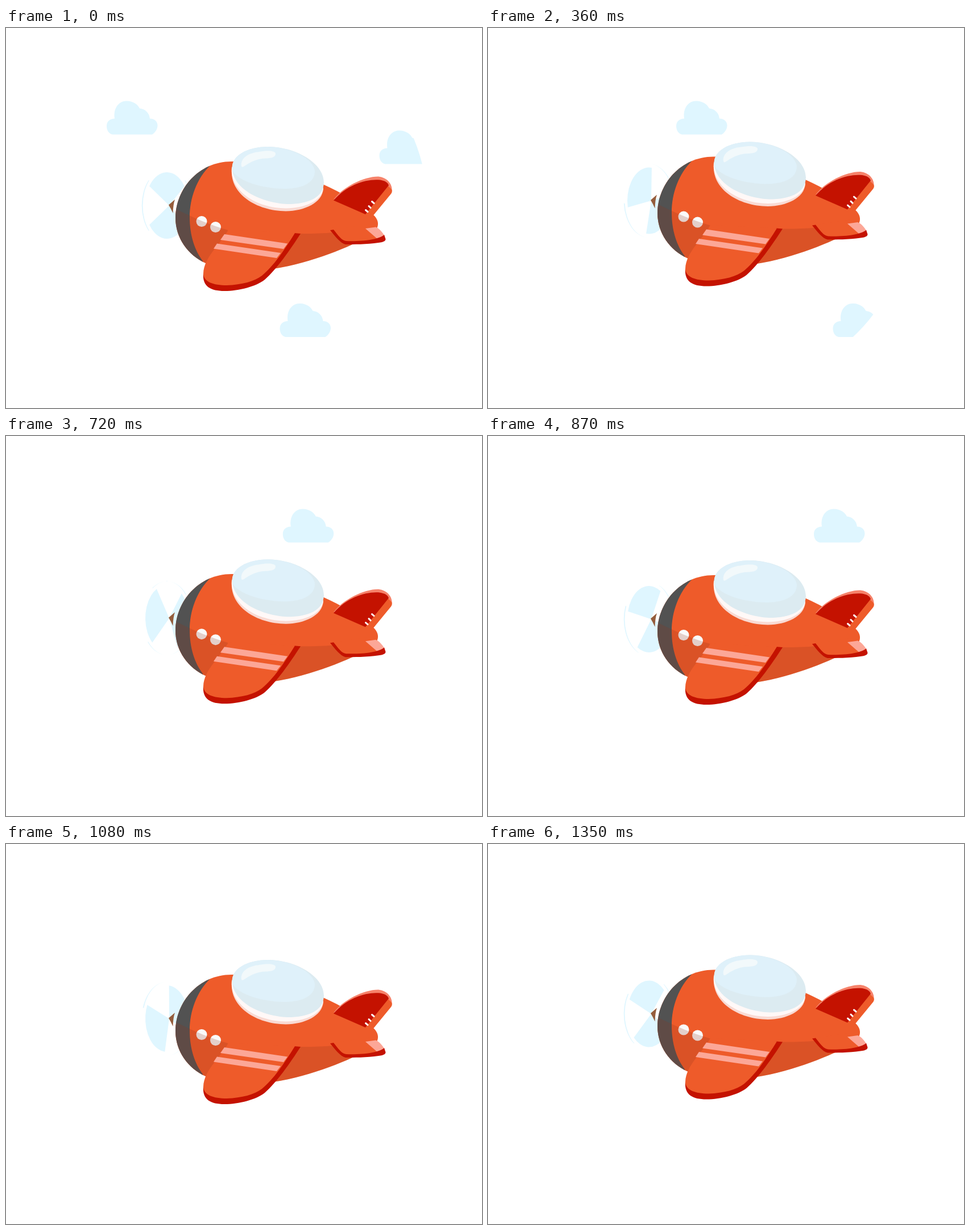
An HTML page with a canvas for the animation above (1.38 s loop, 837 by 669 pixels).

```html
<!DOCTYPE html>
<html lang="en">
<head>
<meta charset="utf-8">
<title>Plane</title>
<style>
  html, body { margin: 0; height: 100%; overflow: hidden; background: #fff; }
  canvas { display: block; }
</style>
</head>
<body>
<canvas id="stage" width="837" height="669"></canvas>
<script>
const ctx = document.getElementById('stage').getContext('2d');
const LOOP = 1380, STEP = 30;
const SKY = '#dff6ff', ORANGE = '#ee5b2a', RED = '#c41200', PINK = '#fca797';

// Motion curves as [ms, value] knots
const bob = [[0, 0], [150, -3], [360, -8.4], [400, -8.6], [570, -1.8], [780, 11.3],
             [870, 10], [1080, -5], [1350, -13.5], [1380, -13.5]];
const spin = [[0, 90], [150, 150], [360, 223], [570, 306], [870, 428], [1080, 510], [1350, 620]];
const clouds = [
  { x: 177, y: 128.5, path: [[0, 0], [150, 62], [360, 154], [570, 233.7], [870, 396], [1080, 545]] },
  { x: 656.5, y: 180.5, path: [[0, 0], [150, 50], [360, 115]] },
  { x: 481.5, y: 485, path: [[0, 0], [150, 56], [360, 125], [570, 182], [870, 270]] }
];

// Smooth curve through the knots
function at(knots, t) {
  const last = knots.length - 1;
  if (t >= knots[last][0]) return knots[last][1];
  const i = knots.findIndex((k, n) => t < knots[n + 1][0]);
  const slope = n => {
    const a = knots[Math.max(n - 1, 0)], b = knots[Math.min(n + 1, last)];
    return (b[1] - a[1]) / (b[0] - a[0]);
  };
  const [t0, v0] = knots[i], [t1, v1] = knots[i + 1];
  const d = t1 - t0, u = (t - t0) / d, w = 1 - u;
  return v0 * w * w * (1 + 2 * u) + v1 * u * u * (3 - 2 * u)
       + d * u * w * (slope(i) * w - slope(i + 1) * u);
}

const cloud = new Path2D('M10 59C2 57 0 49 0 44C0 36 6 31 14 31C11 11 23 0 34 0C45-1 55 6 58 13C68 14 75 21 76 31C85 31 89.500 37 89.500 43C89.500 49 86 55 80 59Z');
const body = new Path2D('M400 235C340 233 298 283 298 334C298 370 320 400 351 414C390 430 440 428 470 424C540 413 604 385 640 366C657 354 658 340 646 329C622 308 590 290 557 275C500 250 450 237 400 235Z');
const nose = new Path2D('M360 241C335 265 323 300 323 333C323 365 332 392 346 410L340 440L280 440V220Z');
const shade = new Path2D('M290 314Q345 343 391 356Q450 363 520 362Q555 362 575 360L598 380H640V450H280Z');

const shapes = [
  // wing
  [RED, 'M347 432C345 455 360 463 384 463C410 463 440 455 455 443C475 426 500 390 518 362L507 361L400 440Z'],
  [ORANGE, 'M391 355C378 380 348 403 347 432C347 447 365 453 388 453C415 452 437 446 450 436C470 420 490 390 508 361Z'],
  [PINK, 'M384 363L495 379.500L488 389L377 373Z'],
  [PINK, 'M371 379.500L483 396L476 405L365 388.500Z'],
  // tailplane
  [ORANGE, 'M575 355L640 345L665 367C655 375 625 377 600 376Z'],
  [PINK, 'M632 353L650 350.500C656 352 664 362 666 367L655 373Z'],
  [RED, 'M570 356L576 355C585 366 590 374 598 375C625 376 655 373 665 364L667 370C669 374 665 377 655 378C635 381 610 381 597 381C588 379 578 366 570 356Z'],
  // fin
  ['#f6836b', 'M576 302C592 280 630 261 655 261.500C670 263 680 275 678.500 287L660 285Z'],
  [ORANGE, 'M670 276L678 284Q680 288 677 292L645 331L631 328Z'],
  [RED, 'M576 303.500C600 275 635 265 658 267.500C667 269 671 272 673 277L632 328Z'],
  // canopy
  ['#f9dad3', 'M397 248C393 292 440 322 492 322.500C525 322 556 308 558 283Z'],
  ['#fff8f7', 'M397 245C393 287 440 317 492 317.500C525 317 556 305 558 281Z'],
  ['#dcebf1', 'M398 250C394 225 425 209 460 209C510 209 559 238 559 272C558 300 530 310 495 310C450 308 402 285 398 250Z'],
  ['#dff1fa', 'M398 250C394 225 425 209 460 209C507 210 541 232 543 252C543 276 515 283 488 283C440 282 403 265 398 250Z'],
  ['#f2f9fb', 'M414 243C412 230 425 220 445 218C460 215 473 216 474 221C474 230 462 229 450 230C432 233 425 240 418 244Q414 246 414 243Z']
].map(([color, d]) => [color, new Path2D(d)]);
const hub = new Path2D('M286 311.500L297 302Q294 310 293.500 326Q290 318 286 311.500Z');
const ticks = new Path2D('M643.500 305.500L647 308.500M638 313.500L641 316.500M632.500 320.500L636 323.500');

function fill(color, path) {
  ctx.fillStyle = color;
  ctx.fill(path);
}

function drawClouds(t) {
  ctx.save();
  ctx.beginPath();
  ctx.arc(427, 315, 314, 0, 2 * Math.PI);
  ctx.clip();
  for (const c of clouds) {
    ctx.save();
    ctx.translate(c.x + at(c.path, t), c.y);
    fill(SKY, cloud);
    ctx.restore();
  }
  ctx.restore();
}

function drawPropeller(degrees) {
  const angle = degrees * Math.PI / 180, half = 0.95, gap = 0.75;
  for (const a of [angle, angle + Math.PI]) {
    const blade = new Path2D();
    blade.moveTo(287, 312.5);
    blade.ellipse(283, 312.5, 38, 58.5, 0, a - half, a + half);
    fill(SKY, blade);

    // thin tapering trail between the blades
    const b = a + Math.PI / 2, trail = new Path2D();
    trail.ellipse(283, 312.5, 44.3, 65, 0, b - gap, b + gap);
    trail.ellipse(283, 312.5, 42.5, 65, 0, b + gap, b - gap, true);
    fill(SKY, trail);
  }
  fill('#955d3c', hub);
}

function drawPlane() {
  fill(ORANGE, body);
  ctx.save();
  ctx.clip(body);
  fill('#525252', nose);
  for (const [x, y] of [[344, 340.5], [368.5, 350.5]]) {
    const lamp = new Path2D();
    lamp.arc(x, y, 9.5, 0, 2 * Math.PI);
    fill('#fafafa', lamp);
  }
  fill('rgba(143,48,27,.21)', shade);
  ctx.restore();
  for (const [color, path] of shapes) fill(color, path);
  ctx.strokeStyle = '#fff';
  ctx.lineWidth = 3;
  ctx.lineCap = 'round';
  ctx.stroke(ticks);
}

function frame(now) {
  const t = Math.floor(now % LOOP / STEP) * STEP;
  ctx.clearRect(0, 0, 837, 669);
  drawClouds(t);
  ctx.save();
  ctx.translate(0, at(bob, t));
  drawPropeller(at(spin, t));
  drawPlane();
  ctx.restore();
  requestAnimationFrame(frame);
}
frame(0);
</script>
</body>
</html>
```
